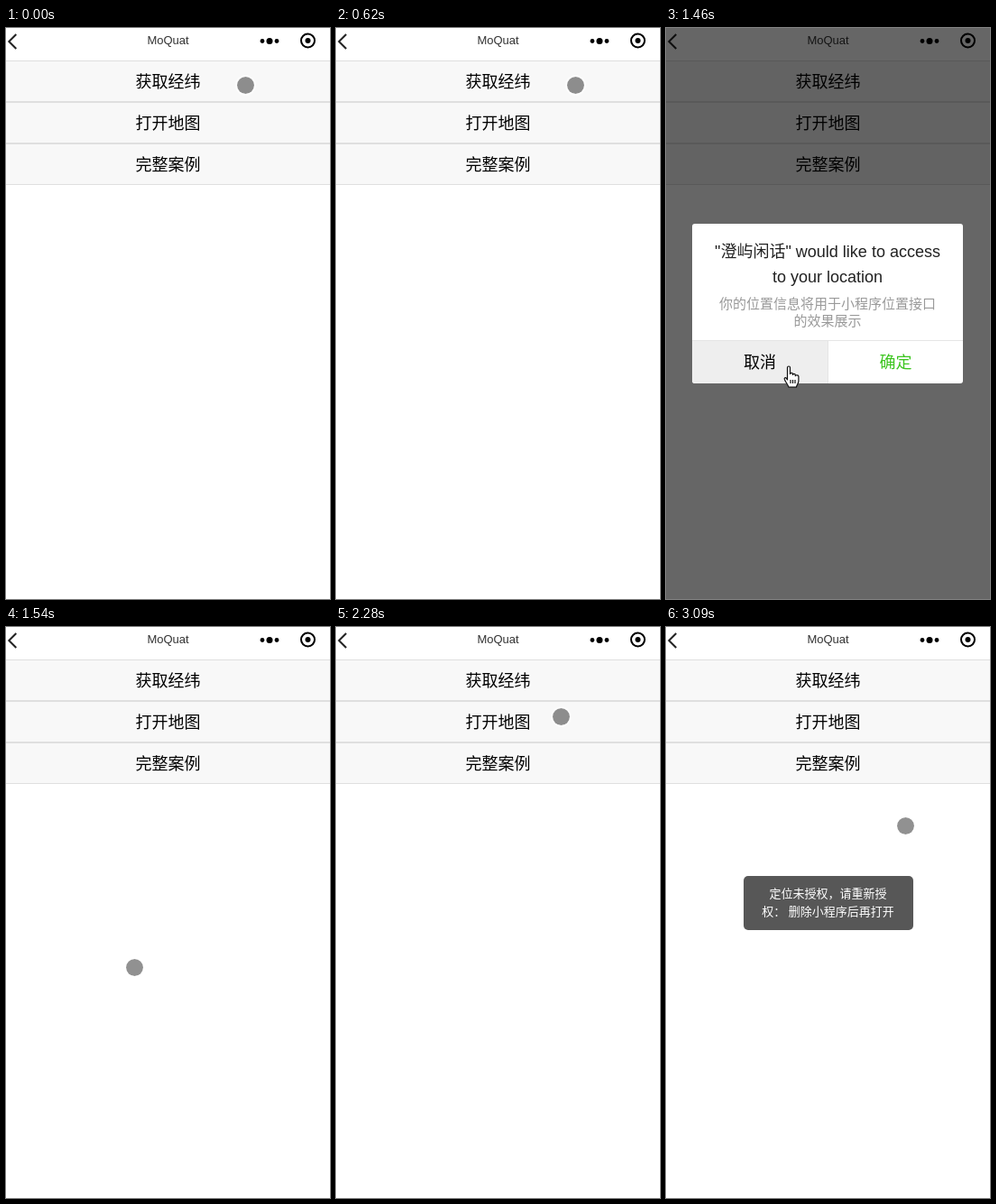
Recreate the animation shown at these times as an HTML page. Size 359x633 px, loop 3.17 s.

```html
<!DOCTYPE html>
<html lang="zh-CN">
<head>
<meta charset="utf-8">
<title>Location demo</title>
<style>
  html, body { margin: 0; width: 100%; height: 100%; overflow: hidden; background: #fff; }
  body { font-family: "Liberation Sans", "Noto Sans CJK SC", "Noto Sans CJK", sans-serif; text-align: center; white-space: nowrap; }
  .stage { position: relative; width: 359px; height: 633px; overflow: hidden; background: #fff; color: #000; }
  .stage *, .stage { box-sizing: border-box; }
  .title { position: absolute; top: 4px; width: 100%; font-size: 13px; line-height: 20px; color: #333; }
  .icons { position: absolute; left: 0; top: 0; }
  .rows { position: absolute; top: 36px; width: 100%; }
  .row { height: 46px; line-height: 46px; font-size: 18px; font-weight: 300; background: #f8f8f8; border: solid #dfdfdf; border-width: 1px 0; }

  .mask { position: absolute; inset: 0; background: rgba(0, 0, 0, .6); }
  .dialog { position: absolute; left: 29px; top: 217px; width: 300px; height: 177px; border-radius: 3px; background: #fff; overflow: hidden; font-weight: 300; }
  .ask { position: absolute; top: 17px; width: 100%; font-size: 18px; line-height: 28px; color: #222; }
  .note { position: absolute; top: 79px; width: 100%; font-size: 15px; line-height: 19px; color: #999; }
  .choice { position: absolute; top: 129px; width: 150px; height: 48px; line-height: 48px; font-size: 18px; border-top: 1px solid #e5e5e5; }
  .ok { left: 150px; color: #3cc51f; border-left: 1px solid #e5e5e5; }

  .toast { position: absolute; left: 85.5px; top: 276px; width: 188px; height: 60px; padding: 10px 0; border-radius: 5px; background: rgba(17, 17, 17, .7); color: #fff; font-size: 13px; line-height: 20px; }
  .touch { position: absolute; left: 0; top: 0; width: 23px; height: 23px; border-radius: 50%; border: 2px solid rgba(255, 255, 255, .5); background: rgba(0, 0, 0, .43); background-clip: padding-box; }
  .hand { position: absolute; left: 0; top: 0; }

  /* Everything shares one 3170 ms clock and changes in hard steps. */
  .press, .mask, .cancel, .toast, .touch, .hand { animation: 3170ms step-end infinite; }
  .press { animation-name: press; }
  .mask { animation-name: mask; }
  .cancel { animation-name: cancel; }
  .toast { animation-name: toast; }
  .touch { animation-name: touch; }
  .hand { animation-name: hand; }

  @keyframes press {
    0%, 19.558%, 78.864% { background: #f8f8f8; color: #000; }
    17.665%, 76.34% { background: #dedede; color: rgba(0, 0, 0, .6); }
  }
  @keyframes mask {
    0%, 48.58% { visibility: hidden; }
    29.337% { visibility: visible; }
  }
  @keyframes cancel {
    0% { background: #fff; }
    46.056% { background: #eee; }
  }
  @keyframes toast {
    0%, 69.4% { visibility: hidden; }
    50.473%, 78.864% { visibility: visible; }
  }
  @keyframes hand {
    0%, 48.58% { visibility: hidden; transform: translate(130px, 374px); }
    36.277% { visibility: visible; transform: translate(176px, 282px); }
    38.801% { visibility: visible; transform: translate(130px, 374px); }
  }
  @keyframes touch {
    0% { visibility: visible; transform: translate(254px, 52px); }
    36.277% { visibility: hidden; transform: translate(254px, 52px); }
    48.58% { visibility: visible; transform: translate(131px, 366px); }
    50.473% { transform: translate(143px, 334px); }
    52.996% { transform: translate(168px, 266px); }
    55.52% { transform: translate(195px, 193px); }
    58.044% { transform: translate(216px, 138px); }
    59.936% { transform: translate(226px, 113px); }
    62.46% { transform: translate(233px, 98px); }
    64.984% { transform: translate(236px, 92px); }
    66.876% { transform: translate(237px, 90px); }
    69.4% { transform: translate(238px, 89px); }
    71.924% { transform: translate(238px, 88px); }
    73.817% { transform: translate(243px, 68px); }
    76.34% { transform: translate(246px, 55px); }
    78.864% { transform: translate(246px, 88px); }
    80.757% { transform: translate(246px, 144px); }
    83.28% { transform: translate(250px, 180px); }
    85.173% { transform: translate(252px, 201px); }
    87.697% { transform: translate(253px, 209px); }
    97.476%, 100% { visibility: visible; transform: translate(254px, 209px); }
  }
</style>
</head>
<body>
<div class="stage">
  <div class="title">MoQuat</div>
  <svg class="icons" width="359" height="36">
    <path d="M11.3 7L3.3 15L11.3 23" fill="none" stroke="#222" stroke-width="2"/>
    <circle cx="284" cy="14.5" r="2.4"/>
    <circle cx="292" cy="14.5" r="3.5"/>
    <circle cx="300" cy="14.5" r="2.4"/>
    <circle cx="334.5" cy="14" r="7.5" fill="none" stroke="#000" stroke-width="2"/>
    <circle cx="334.5" cy="14" r="3"/>
  </svg>
  <div class="rows">
    <div class="row press">获取经纬</div>
    <div class="row">打开地图</div>
    <div class="row">完整案例</div>
  </div>
  <div class="toast">定位未授权，请重新授<br>权： 删除小程序后再打开</div>
  <div class="mask">
    <div class="dialog">
      <div class="ask">"澄屿闲话" would like to access<br>to your location</div>
      <div class="note">你的位置信息将用于小程序位置接口<br>的效果展示</div>
      <div class="choice cancel">取消</div>
      <div class="choice ok">确定</div>
    </div>
  </div>
  <div class="touch"></div>
  <svg class="hand" width="19" height="26" stroke="#111" stroke-width="1.2" stroke-linejoin="round">
    <path fill="#fff" d="M4.5 2.5c0-2 3-2 3 0v7c0-1.5 3-1.5 3 .3v.7c0-1.5 2.8-1.4 2.8.4v.8c0-1.3 3.6-1.3 3.6.5v5c0 3-2 4-2.5 7h-8.5c-.5-2.5-2.5-4-4.5-8.5-.8-2 1.2-2.6 2-1.4l1.1 1.6z"/>
    <path fill="none" d="M8 16v4M10.5 16v4M13 16v4"/>
  </svg>
</div>
</body>
</html>
```
